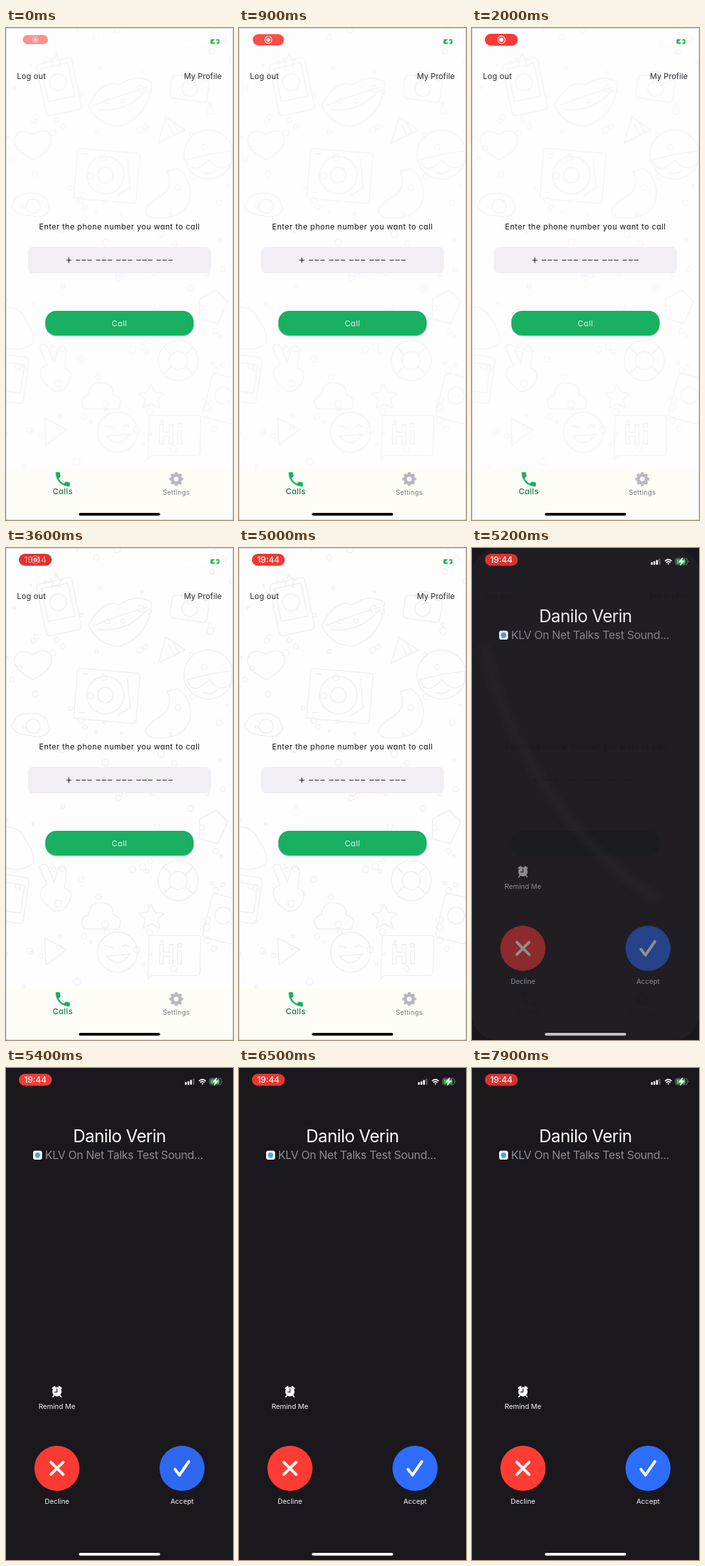
Recreate the animation shown at these times as an HTML page. Size 352 by 762 pixels, loop 8 s.

```html
<!DOCTYPE html>
<html lang="en">
<head>
<meta charset="utf-8">
<style>
html, body { margin: 0; width: 100%; height: 100%; overflow: hidden; background: #0c0a0e; }
svg { display: block; width: 100vw; height: 100vh; font-family: Inter, "Open Sans", sans-serif; }
#app { font-size: 12px; letter-spacing: .49px; font-feature-settings: "cv11"; }
.mid { text-anchor: middle; }
#doodles { fill: none; stroke: #f3f1f5; stroke-width: 2; stroke-linejoin: round; stroke-linecap: round; }
.label { font-size: 10.8px; fill: #f4f3f5; text-anchor: middle; }
.mark { fill: none; stroke: #fff; stroke-width: 4.4; stroke-linecap: round; stroke-linejoin: round; }
</style>
</head>
<body>
<svg viewBox="0 0 352 762" preserveAspectRatio="none">
  <defs>
    <clipPath id="screen"><rect id="corner" width="352" height="762"/></clipPath>
    <filter id="soft" x="-20%" y="-20%" width="140%" height="140%"><feGaussianBlur stdDeviation="6"/></filter>
  </defs>

  <g id="app" clip-path="url(#screen)">
    <rect width="352" height="762" fill="#fefdfe"/>
    <g id="doodles">
      <g transform="rotate(-12 82 90)"><rect x="54" y="50" width="56" height="82" rx="6"/><rect x="61" y="58" width="42" height="52"/><circle cx="82" cy="84" r="13"/></g>
      <path d="M128 120Q150 78 176 88Q200 70 226 84Q222 138 176 152Q144 152 128 120ZM136 120Q176 104 218 92M142 126Q186 132 218 96"/>
      <g transform="rotate(8 285 92)"><rect x="256" y="76" width="58" height="36" rx="6"/><circle cx="285" cy="94" r="12"/><path d="M270 76l5-8h18l5 8"/></g>
      <path d="M78 39l3 8 8 1-6 5 2 8-7-4-7 4 2-8-6-5 8-1ZM225 552l6 12 14 2-10 9 3 14-13-7-12 7 3-14-10-9 13-2Z"/>
      <path d="M248 138l30 20-42 20ZM252 150l10 18M258 144l10 18"/>
      <path d="M42 204Q12 188 13 173Q18 152 42 165Q66 150 71 173Q70 190 42 204Z"/>
      <g transform="rotate(5 156 228)"><rect x="108" y="190" width="97" height="78" rx="5"/><circle cx="154" cy="228" r="29"/><circle cx="154" cy="228" r="12"/><path d="M186 200l8 44-18 14M116 198h8M116 258h8"/></g>
      <circle cx="314" cy="196" r="38"/>
      <path d="M280 204l34-8 36-6v18q-14 16-30 2l-5-6-8 7q-18 16-27-7M306 224q12 4 20-4"/>
      <path d="M250 222Q262 250 234 264Q202 286 228 294Q282 298 286 258Q286 230 266 218Z"/>
      <path d="M16 262q24-14 46 2l6 16q-8 18-32 10-20 0-28-14Z"/><circle cx="42" cy="276" r="11"/>
      <path d="M0 432q22 0 30 20 16 20 12 36-16 14-42 8M300 420l26-14 18 18-16 34-28-8Z"/>
      <g transform="rotate(8 14 540)"><rect x="-16" y="508" width="48" height="72" rx="6"/><path d="M-10 520h36v44h-36"/></g>
      <path d="M58 548q-12-20 6-26l-12-28q6-9 13 0l10 24 6-22q9-6 13 3l-3 28q14 4 8 18-6 18-24 18Z"/>
      <circle cx="267" cy="515" r="31"/><circle cx="267" cy="515" r="14"/>
      <path d="M244 494l12 12M290 494l-12 12M244 536l12-12M290 536l-12-12"/>
      <path d="M122 590q-12-16 6-22 2-22 22-18 18 2 16 18 18 6 8 22ZM60 604l34 18-32 24Z"/>
      <g transform="rotate(14 332 572)"><rect x="312" y="538" width="50" height="70" rx="6"/><circle cx="336" cy="568" r="13"/></g>
      <circle cx="173" cy="626" r="31"/>
      <path d="M154 616l12 3M180 618q6-6 11 0M156 632q18 22 36-3Z"/>
      <path d="M226 600h72q4 0 4 4l-1 52q0 6-5 6h-70l-6 6 2-64q0-4 4-4ZM238 614v30h6v-12h9v12h6v-30h-6v12h-9v-12ZM266 624h6v20h-6ZM266 613h6v5h-6Z"/>
      <g id="dots"></g>
    </g>

    <g fill="#28262b">
      <text x="17" y="79" letter-spacing=".28">Log out</text>
      <text x="334.5" y="79" text-anchor="end" letter-spacing=".1">My Profile</text>
    </g>
    <text class="mid" x="176" y="312" fill="#141216">Enter the phone number you want to call</text>

    <rect x="34" y="339" width="284" height="41" rx="8" fill="#f1eff3"/>
    <g fill="none" stroke="#1c1a1f" stroke-width="1.2">
      <path d="M93.5 359.5h8M97.5 355.5v8"/>
      <path d="M108.3 359.5h150" stroke-dasharray="6.8 2.2 6.8 2.2 6.8 6.5"/>
    </g>

    <rect x="61" y="440" width="230" height="37.5" rx="17" fill="#a9c4b6"/>
    <rect x="61" y="438" width="230" height="38" rx="17" fill="#19b062"/>
    <text class="mid" x="176" y="461.5" fill="#e2f6ea">Call</text>

    <rect y="682" width="352" height="80" fill="#fdfcf6"/>
    <path transform="translate(73.4 684.4) scale(1.22)" fill="#19b062" d="M6.6 10.8c1.4 2.8 3.8 5.1 6.6 6.6l2.2-2.2c.3-.3.7-.4 1-.2 1.100.4 2.300.6 3.600.6.6 0 1 .4 1 1V20c0 .6-.4 1-1 1C10.600 21 3 13.400 3 4c0-.6.4-1 1-1h3.500c.6 0 1 .4 1 1 0 1.200.2 2.400.6 3.600.1.3 0 .7-.3 1Z"/>
    <text class="mid" x="88" y="722" font-weight="500" fill="#17724a">Calls</text>
    <g fill="none" stroke="#b9b7be">
      <circle cx="264" cy="698.500" r="6.200" stroke-width="5"/>
      <circle cx="264" cy="698.500" r="9" stroke-width="3.600" pathLength="16" stroke-dasharray="1.100 .9" stroke-dashoffset=".55"/>
    </g>
    <text class="mid" x="264" y="723" font-size="10" letter-spacing=".4" fill="#77757b">Settings</text>
    <rect x=".5" y=".5" width="351" height="761" fill="none" stroke="#dcdadd"/>
  </g>

  <g id="call">
    <rect id="shade" width="352" height="762" fill="#1a181d"/>
    <path id="streak" d="M18 150C60 330 180 480 290 545" fill="none" stroke="#40373a" stroke-width="13" filter="url(#soft)"/>
    <g id="head">
      <text class="mid" x="176" y="114.500" font-size="26.500" letter-spacing="-.55" fill="#fff">Danilo Verin</text>
      <rect x="42" y="128" width="14" height="14" rx="3.500" fill="#f4f7fa"/>
      <circle cx="49" cy="135" r="4" fill="#45a5e6"/>
      <text x="60.500" y="141" font-size="17.500" letter-spacing="-.37" fill="#8c8a8f">KLV On Net Talks Test Sound...</text>
    </g>
    <g id="actions">
      <g fill="none" stroke="#fff" stroke-linecap="round">
        <circle cx="79" cy="501.500" r="7.200" fill="#fff" stroke="none"/>
        <path stroke-width="2.600" d="M72.500 496l3-2.300M85.500 496l-3-2.300"/>
        <path stroke-width="1.800" d="M74 507.500l-1.500 1.800M84 507.500l1.500 1.800"/>
        <path stroke="#1a181d" stroke-width="1.300" d="M79 497v4.800h-3.600"/>
      </g>
      <text class="label" x="79" y="528">Remind Me</text>
      <circle id="no" cx="79" cy="620" r="35"/>
      <path class="mark" d="M69.500 610.500l19 19M88.500 610.500l-19 19"/>
      <circle id="yes" cx="273" cy="620" r="35"/>
      <path class="mark" d="M262 621.500l7 9 14.500-21"/>
      <text class="label" x="79" y="675">Decline</text>
      <text class="label" x="273" y="675">Accept</text>
    </g>
  </g>

  <g id="status" fill="#fff">
    <rect x="277.500" y="22" width="2.700" height="4" rx=".7"/>
    <rect x="281.500" y="20.500" width="2.700" height="5.500" rx=".7"/>
    <rect x="285.500" y="18.500" width="2.700" height="7.500" rx=".7"/>
    <rect x="289.500" y="16.500" width="2.700" height="9.500" rx=".7" opacity=".3"/>
    <g fill="none" stroke="#fff" stroke-width="1.800">
      <path d="M299.300 20.200q5.200-5 10.400 0M301.300 22.500q3.200-3 6.400 0"/>
    </g>
    <path d="M302.900 24.100q1.600-1.300 3.200 0l-1.600 1.900Z"/>
    <rect x="315.500" y="16" width="18.500" height="10" rx="3" fill="none" stroke="#fff" opacity=".4"/>
    <path d="M335 19.500q1.500 1.500 0 3Z" opacity=".5"/>
    <rect x="317" y="17.300" width="14" height="7.400" rx="1.600" fill="#30bd58"/>
    <path d="M326.500 15l-6 6.700h4l-1.500 5.300 6.200-7h-4.200Z" stroke="#fff" stroke-width=".8"/>
  </g>

  <rect id="pill"/>
  <g id="rec">
    <circle r="5.800" fill="none" stroke="#fff" stroke-width="1.200"/>
    <circle r="3.200" fill="#fff"/>
  </g>
  <text id="clock" class="mid" x="45.500" y="22.800" font-size="13" font-weight="500" fill="#fff">19:44</text>
  <rect id="home" x="113" y="751" width="126" height="4.300" rx="2.150"/>
</svg>
<script>
const LOOP = 8000, CALL = 5090;
const $ = id => document.getElementById(id);
const set = (id, attrs) => { for (const k in attrs) $(id).setAttribute(k, attrs[k]); };
const rgb = (...c) => `rgb(${c.map(Math.round)})`;

// Linear interpolation through alternating times and values
function key(t, ...k) {
  if (t <= k[0]) return k[1];
  for (let i = 2; i < k.length; i += 2)
    if (t < k[i]) return k[i - 1] + (k[i + 1] - k[i - 1]) * (t - k[i - 2]) / (k[i] - k[i - 2]);
  return k[k.length - 1];
}

// Small rings scattered between the large doodles
let seed = 7;
const rand = () => (seed = seed * 16807 % 2147483647) / 2147483647;
let rings = "";
for (let i = 0; i < 120; i++)
  rings += `<circle cx="${rand() * 352}" cy="${rand() * 682}" r="${1.5 + rand() * 4}" stroke-width="1.5"/>`;
$("dots").innerHTML = rings;

function draw(t) {
  const ringing = t >= CALL;

  const grow = key(t, 550, 0, 1000, 1);
  const glow = key(t, 2000, 1, 2400, .95, 3300, .1, 3600, .15, 4300, .7, 5000, .7,
    5100, -.4, 5400, 1, 6150, .1, 6900, 1, 7250, 1, 7900, .05);
  const swap = key(t, 3450, 0, 3750, 1);
  set("pill", {
    x: 26 - 6 * grow, y: 11 - 2 * grow, width: 39 + 12 * grow, height: 14 + 4.5 * grow,
    rx: 7 + 2.25 * grow, opacity: .55 + .45 * grow, fill: rgb(217 + 32 * glow, 50 + 8 * glow, 48 + 6 * glow)
  });
  set("rec", { transform: `translate(45.5 18.2) scale(${.75 + .25 * grow})`, opacity: (.7 + .3 * grow) * (1 - swap) });
  set("clock", { opacity: swap });

  set("doodles", { opacity: key(t, 500, .65, 2300, .65, 3200, 1) });
  set("corner", { rx: ringing ? 40 : 0 });

  set("call", { display: ringing ? "inline" : "none" });
  set("shade", { opacity: key(t, 5100, .955, 5350, 1) });
  set("streak", { opacity: key(t, 5100, .35, 5350, 0) });
  set("head", { opacity: key(t, 5100, .83, 5300, 1) });
  set("actions", { opacity: key(t, 5100, .15, 5350, 1) });
  const vivid = key(t, 5400, 0, 6700, 1);
  set("no", { fill: rgb(251 + 4 * vivid, 58 + 2 * vivid, 52) });
  set("yes", { fill: rgb(46, 104 + 6 * vivid, 239 + 16 * vivid) });

  const home = ringing ? key(t, 5100, 136, 5300, 255) : 0;
  set("home", { fill: rgb(home, home, home) });
}

const start = performance.now();
function tick() {
  draw((performance.now() - start) % LOOP);
  requestAnimationFrame(tick);
}
tick();
</script>
</body>
</html>
```
